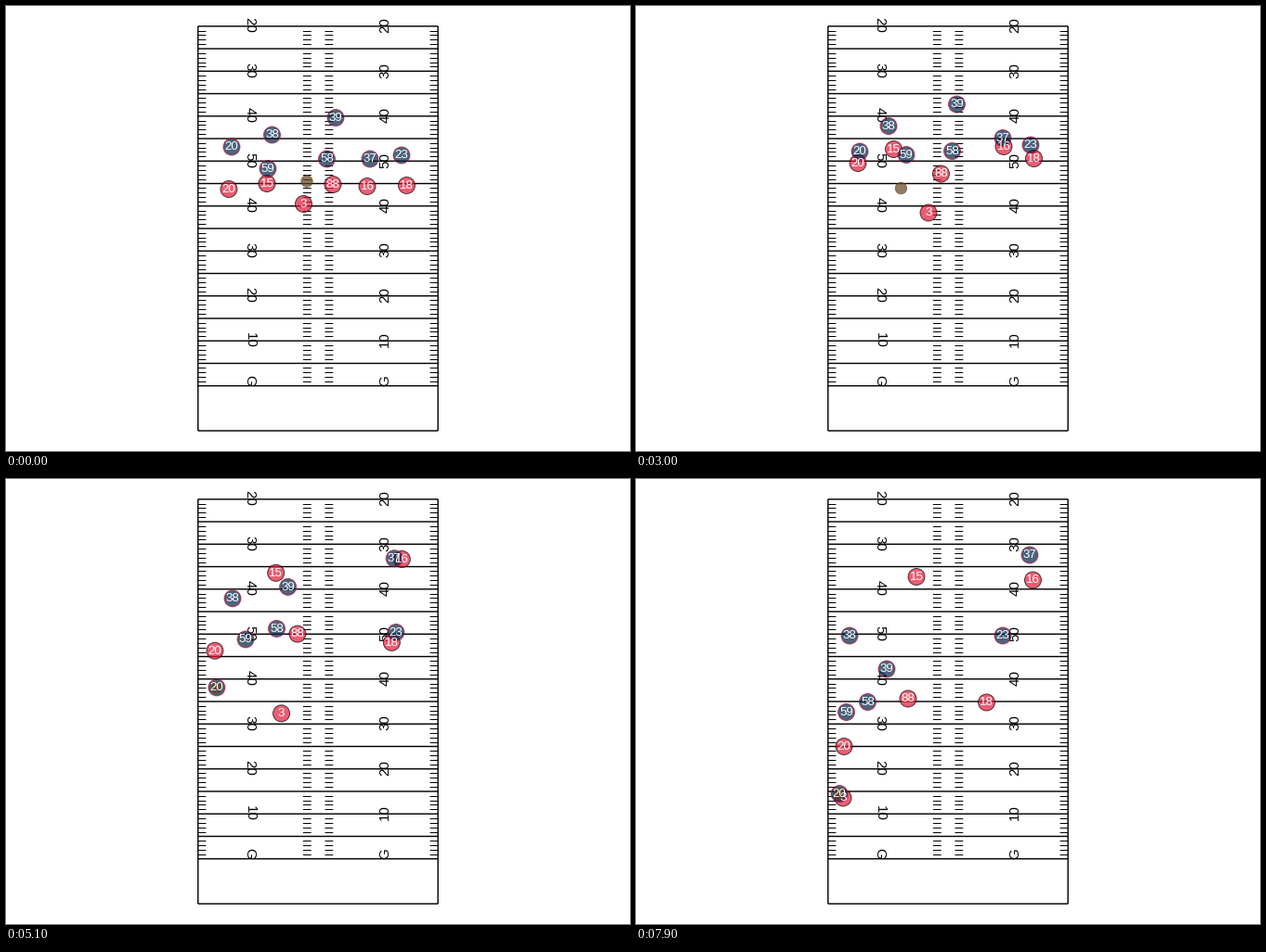
A matplotlib script for the animation above (8 s loop, 672x480 px).

```python
import numpy as np
import matplotlib.pyplot as plt
from matplotlib.animation import FuncAnimation
from matplotlib.patches import Circle

W, H, DPI = 672, 480, 96
FRAMES, INTERVAL = 80, 100
PX = 72 / DPI                      # points per pixel
PT = 72.27 / 25.4                  # points per mm of text size
YARD = H / 1.1 / 90                # pixels per yard
WIDTH = 53.3                       # field width in yards
LEFT = W / 2 - WIDTH * YARD / 2
RIGHT = W - LEFT
GOAL = H / 22 + 80 * YARD

plt.rcParams["font.family"] = "Liberation Sans"

CLOCK = np.arange(FRAMES) * INTERVAL / 1000

# Everyone waits for the snap, then runs through three more spots.
BEATS = np.array([1.2, 3.0, 4.6, 7.9])
RED = {
    20: [(240, 197.5), (239, 169.5), (227, 175.5), (224, 288.5)],
    15: [(281, 191.5), (277.5, 154.5), (288, 108.5), (302, 105.5)],
    88: [(352, 192.5), (328.5, 181), (317.5, 164), (293, 237)],
    16: [(389, 194.5), (396, 151.5), (422, 94), (427.5, 109)],
    18: [(431.5, 193.5), (428.5, 164.5), (420, 170), (377.5, 241)],
    3: [(320.5, 213.5), (315, 223), (304.5, 242), (223, 344)],
}
BLUE = {
    20: [(243, 152), (241, 157), (229.5, 207), (219, 339.5)],
    38: [(286.5, 139), (272, 129.5), (249, 126), (230, 169)],
    39: [(355, 120.5), (345.5, 106), (312, 108.5), (270, 205)],
    59: [(282, 175.5), (291, 160.5), (265, 165.5), (226.5, 251.5)],
    58: [(345.5, 165), (340.5, 156.5), (301.5, 155), (249.5, 240.5)],
    37: [(392, 165), (395, 142.5), (414.5, 94), (424, 82)],
    23: [(426, 161), (425, 150), (422.5, 163), (395, 169)],
}
SPOT = np.array([324, 189])        # ball before the snap


def run(spots):
    """Smooth path through the spots, starting from rest at the snap."""
    p = np.array(spots, float)
    m = np.gradient(p, BEATS, axis=0)
    m[0] = 0
    t = np.maximum(CLOCK, BEATS[0])
    i = np.clip(np.searchsorted(BEATS, t) - 1, 0, len(BEATS) - 2)
    h = np.diff(BEATS)[i]
    s = ((t - BEATS[i]) / h)[:, None]
    bend = (1 - s) * m[i] - s * m[i + 1]
    ease = s * s * (3 - 2 * s)
    return p[i] + ease * (p[i + 1] - p[i]) + h[:, None] * s * (1 - s) * bend


def travel(a, b, begin, end):
    """Go from a to b at even pace, either of which may itself be moving."""
    s = np.clip((CLOCK - begin) / (end - begin), 0, 1)[:, None]
    return a + (b - a) * s


def yard_y(yd):
    return GOAL - yd * YARD


fig = plt.figure(figsize=(W / DPI, H / DPI), dpi=DPI, facecolor="white")
ax = fig.add_axes([0, 0, 1, 1])
ax.set(xlim=(0, W), ylim=(H, 0))
ax.axis("off")


def line(xs, ys):
    ax.plot(xs, ys, color="black", lw=0.5 * PT * PX, snap=False,
            solid_capstyle="butt", zorder=1)


def draw_field():
    for yd in [-10, *range(0, 81, 5)]:
        line((LEFT, RIGHT), (yard_y(yd),) * 2)
    for x in (LEFT, RIGHT):
        line((x, x), (yard_y(-10), yard_y(80)))

    size = 4 * PT
    em = size / PX
    adv = 0.556 * em
    marks = [np.floor(yard_y(yd) + 0.4) + 0.5 for yd in range(1, 80) if yd % 5]
    for x in (LEFT, LEFT + 23.367 * YARD, LEFT + 29.967 * YARD - adv, RIGHT - adv):
        ax.hlines(marks, x - 0.2, x + adv + 0.2, color="black", lw=PX,
                  snap=False, zorder=1)

    half = 0.344 * em
    for yd in range(0, 81, 10):
        label = str(50 - abs(50 - yd)) if yd else "G"
        y = yard_y(yd) - (1.2 if yd else 0.4 * em)
        for x, turn in ((LEFT + 12 * YARD - half - 1.3, -90),
                        (RIGHT - 12 * YARD + half, 90)):
            ax.text(x, y, label, size=size, rotation=turn, ha="center",
                    va="baseline", rotation_mode="anchor", zorder=2)


def disc(size, fill, edge, z):
    """Round marker whose size is given in mm, outlined by a thin stroke."""
    r = 0.375 * (size * PT + 0.945) / PX
    return ax.add_patch(Circle((0, 0), r, fc=fill, ec=edge, alpha=0.7,
                               lw=0.945 * PX, zorder=z))


def add_team(routes, fill, edge, z):
    for number, spots in routes.items():
        label = ax.text(0, 0, str(number), color="white", size=3.5 * PT,
                        ha="center", va="baseline", zorder=6)
        movers.append((run(spots), disc(6, fill, edge, z), label))


movers = []
draw_field()
add_team(RED, "#E31837", "black", 3)
add_team(BLUE, "#002244", "#C60C30", 4)

# Snapped to the passer, thrown, and caught by the other side.
held = travel(SPOT, run(RED[3]), 1.05, 1.55)
ball = travel(held, run(BLUE[20]), 2.6, 3.6)
movers.append((ball, disc(4, "#654321", "#654321", 5), None))


def update(i):
    for path, dot, label in movers:
        x, y = path[i]
        dot.center = x, y
        if label:
            label.set_position((x, y + 3.3))
    return []


anim = FuncAnimation(fig, update, frames=FRAMES, interval=INTERVAL,
                     repeat=True, repeat_delay=0, blit=False)
plt.show()
```
